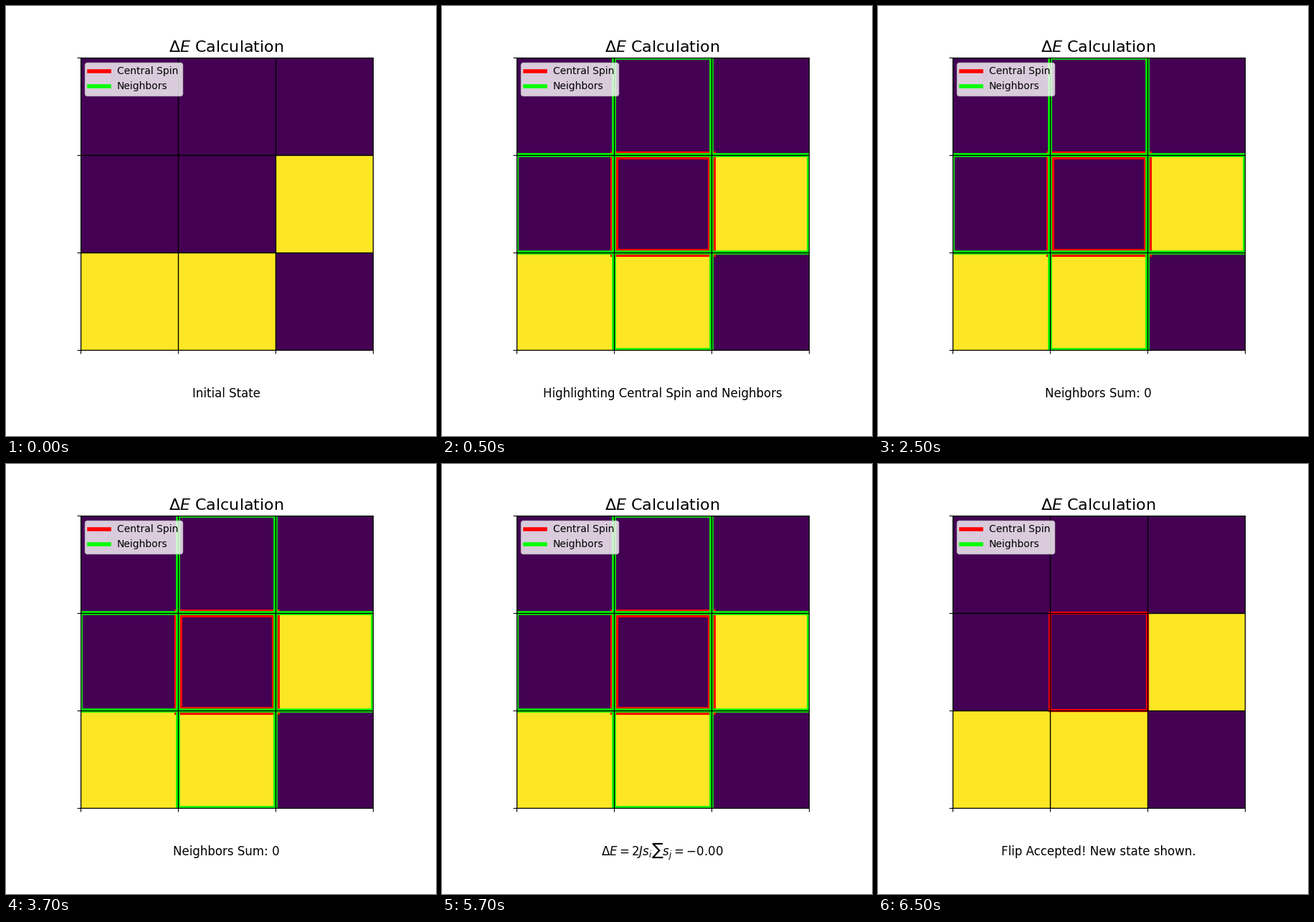
Animation of 600x600 px, one loop 8000 ms. Source, as a matplotlib script:

```python
import matplotlib.pyplot as plt
import numpy as np
from matplotlib.animation import FuncAnimation
from matplotlib.lines import Line2D
from matplotlib.patches import Rectangle

plt.rcParams["font.family"] = "DejaVu Sans"

STEP_MS = 500
TOTAL_STEPS = 16
CENTER = (1, 1)
NEIGHBORS = [(0, 1), (2, 1), (1, 0), (1, 2)]
spins = np.array([[-1, -1, -1], [-1, -1, 1], [1, 1, -1]])

neighbor_sum = sum(spins[cell] for cell in NEIGHBORS)
delta_e = 2.0 * spins[CENTER] * neighbor_sum

# (first step, caption, central outline width, neighbors shown)
STAGES = [
    (0, "Initial State", 0, False),
    (1, "Highlighting Central Spin and Neighbors", 8, True),
    (5, f"Neighbors Sum: {neighbor_sum}", 8, True),
    (9, rf"$\Delta E = 2 J s_i \sum s_j = {{-{abs(delta_e):.2f}}}$", 8, True),
    (13, "Flip Accepted! New state shown.", 3, False),
]

fig, ax = plt.subplots(figsize=(6, 6), dpi=100)
fig.subplots_adjust(bottom=0.2)
ax.imshow(spins, cmap="viridis", vmin=-1, vmax=1)
ax.set_title(r"$\Delta E$ Calculation", fontsize=16)

edges = np.arange(-0.5, 3, 1)
ax.set_xticks(edges, labels=[])
ax.set_yticks(edges, labels=[])
ax.grid(color="black", linewidth=1)


def outline(cell, color, width):
    row, col = cell
    return ax.add_patch(Rectangle((col - 0.5, row - 0.5), 1, 1, fill=False,
                                  edgecolor=color, linewidth=width))


central_box = outline(CENTER, "red", 8)
neighbor_boxes = [outline(cell, "lime", 4) for cell in NEIGHBORS]
caption = ax.text(0.5, -0.15, "", transform=ax.transAxes, fontsize=12,
                  ha="center", va="center")
ax.legend(handles=[Line2D([], [], color="red", lw=4, label="Central Spin"),
                   Line2D([], [], color="lime", lw=4, label="Neighbors")],
          loc="upper left")


def update(step):
    _, text, width, show_neighbors = [s for s in STAGES if s[0] <= step][-1]
    caption.set_text(text)
    central_box.set_visible(width > 0)
    central_box.set_linewidth(width)
    for box in neighbor_boxes:
        box.set_visible(show_neighbors)
    return [caption, central_box, *neighbor_boxes]


animation = FuncAnimation(fig, update, frames=TOTAL_STEPS, interval=STEP_MS,
                          repeat=True, repeat_delay=0)
plt.show()
```
